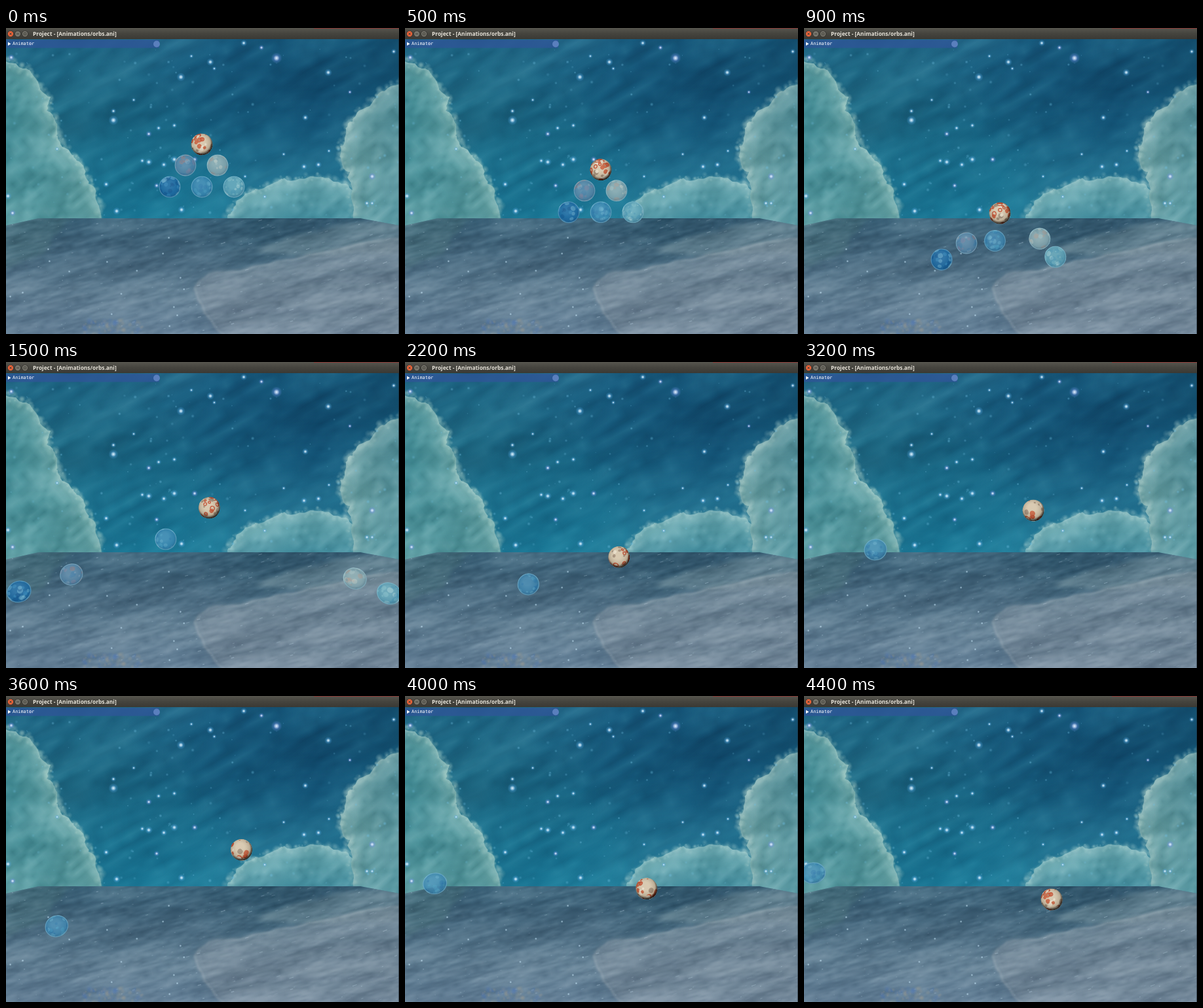
Animation of 600x468 px, one loop 4500 ms. Source, as an HTML page with a canvas:

```html
<!DOCTYPE html>
<html lang="en">
<head>
<meta charset="utf-8">
<title>Orbs</title>
<style>
  html, body { margin: 0; width: 600px; height: 468px; overflow: hidden; background: #18607f; }
  canvas { display: block; }
  div { position: absolute; white-space: pre; }
  #title { left: 41px; top: 0; line-height: 18px; font: bold 8.4px/18px "Open Sans", "Noto Sans", sans-serif; color: #e6e2d8; }
  #panel { left: 10px; top: 18px; font: 6.9px/13px "DejaVu Sans Mono", monospace; color: #fff; }
</style>
</head>
<body>
<canvas id="stage" width="600" height="468"></canvas>
<div id="title">Project - [Animations/orbs.ani]</div>
<div id="panel">Animator</div>
<script>
const W = 600, H = 468, LOOP = 4500, STEP = 100, TAU = Math.PI * 2;
const ctx = document.getElementById('stage').getContext('2d');

function seeded(s) {
  return () => {
    s = (s + 0x6D2B79F5) | 0;
    let n = Math.imul(s ^ (s >>> 15), 1 | s);
    n = (n + Math.imul(n ^ (n >>> 7), 61 | n)) ^ n;
    return ((n ^ (n >>> 14)) >>> 0) / 4294967296;
  };
}

function makeCanvas(w, h) {
  const c = document.createElement('canvas');
  c.width = w;
  c.height = h;
  return c;
}

const rnd = seeded(7);
const spread = a => (rnd() - 0.5) * 2 * a;
const scene = makeCanvas(W, H);
const g = scene.getContext('2d');

function disc(c, x, y, r, fill) {
  c.fillStyle = fill;
  c.beginPath();
  c.arc(x, y, r, 0, TAU);
  c.fill();
}

function glow(x, y, r, rgb, a) {
  const p = g.createRadialGradient(x, y, 0, x, y, r);
  p.addColorStop(0, `rgba(${rgb},${a})`);
  p.addColorStop(1, `rgba(${rgb},0)`);
  disc(g, x, y, r, p);
}

// Smooth value noise: a tiny random picture, scaled up
function noise(cw, ch, alpha, angle) {
  const w = Math.ceil(900 / cw), h = Math.ceil(900 / ch);
  const tile = makeCanvas(w, h), t = tile.getContext('2d');
  for (let y = 0; y < h; y++) for (let x = 0; x < w; x++) {
    const v = rnd() * 255 | 0;
    t.fillStyle = `rgb(${v},${v},${v})`;
    t.fillRect(x, y, 1, 1);
  }
  g.save();
  g.globalCompositeOperation = 'soft-light';
  g.globalAlpha = alpha;
  g.translate(W / 2, H / 2);
  g.rotate(angle);
  g.drawImage(tile, -450, -450, 900, 900);
  g.restore();
}

function rough(pts, amp, depth) {
  for (; depth > 0; depth--, amp /= 1.8) {
    const out = [];
    pts.forEach((p, i) => {
      out.push(p);
      const q = pts[i + 1];
      if (q) out.push([(p[0] + q[0]) / 2 + spread(amp), (p[1] + q[1]) / 2 + spread(amp)]);
    });
    pts = out;
  }
  return pts;
}

function pathOf(pts) {
  const p = new Path2D();
  pts.forEach(([x, y], i) => i ? p.lineTo(x, y) : p.moveTo(x, y));
  return p;
}

function cloud(edge, corners, fill, rim, strength) {
  edge = rough(edge, 5, 3);
  const line = pathOf(edge), area = pathOf(edge.concat(corners));
  g.save();
  g.filter = 'blur(2px)';
  g.fillStyle = fill;
  g.fill(area);
  g.clip(area);
  g.strokeStyle = `rgb(${rim})`;
  for (const [width, blur, alpha] of [[70, 18, 0.25], [22, 7, 0.3], [4, 1.5, 0.35]]) {
    g.filter = `blur(${blur}px)`;
    g.globalAlpha = alpha * strength;
    g.lineWidth = width;
    g.stroke(line);
  }
  g.filter = 'none';
  g.globalAlpha = 1;
  noise(34, 26, 0.35, -0.5);
  noise(11, 8, 0.25, -0.7);
  g.restore();
  for (const [x, y] of edge)
    for (let i = 0; i < 2; i++)
      glow(x + spread(6), y + spread(6), 2 + rnd() * 5, rim, 0.28 * strength);
}

function vertical(y0, y1, ...colors) {
  const p = g.createLinearGradient(0, y0, 0, y1);
  colors.forEach((c, i) => p.addColorStop(i / (colors.length - 1), c));
  return p;
}

function drawSky() {
  g.fillStyle = vertical(17, 292, '#195e7f', '#196685', '#1c7795');
  g.fillRect(0, 0, W, H);
  glow(90, 130, 190, '40,120,140', 0.45);
  glow(210, 270, 170, '26,126,156', 0.5);
  glow(470, 120, 200, '14,70,108', 0.6);
  glow(330, 30, 150, '22,88,126', 0.4);
  noise(150, 45, 0.28, -0.45);
  noise(50, 12, 0.16, -0.5);
  noise(16, 9, 0.1, -0.4);

  cloud([[-5, 47], [20, 60], [46, 78], [68, 105], [63, 127], [78, 158], [86, 182], [108, 203], [121, 226], [136, 246], [146, 292]],
    [[146, 310], [-5, 310]], vertical(50, 300, '#35818c', '#468f98', '#5b9da3'), '172,210,202', 1);
  cloud([[338, 288], [352, 264], [380, 246], [420, 231], [460, 229], [500, 235], [532, 250]],
    [[532, 310], [338, 310]], vertical(228, 292, '#4b929f', '#559ca8', '#438d9e'), '176,214,212', 0.9);
  cloud([[605, 83], [570, 99], [545, 124], [522, 146], [517, 175], [510, 196], [523, 220], [528, 242], [530, 292]],
    [[605, 310]], vertical(85, 300, '#42818f', '#5c979f', '#5a9aa4'), '176,208,202', 0.9);
}

const STARS = [
  413,46,5, 312,52,3.5, 267,75,4, 363,23,3, 390,30,2.5, 318,62,2, 492,68,3.5, 592,36,2.5,
  8,45,3, 164,127,2.5, 164,141,4.5, 457,137,3, 218,162,2.8, 233,153,2.5, 257,149,2.5,
  257,201,3.5, 288,201,3, 218,205,3.5, 208,203,2.5, 241,209,3, 230,241,2.6, 153,239,3,
  169,280,3.5, 3,257,3.5, 10,283,3, 268,278,3.5, 455,212,3, 477,209,3, 559,227,3.5,
  493,188,2, 551,268,2.6, 559,268,2.3, 525,98,2, 424,193,2, 365,227,2, 283,43,2,
  37,24,3, 195,110,2, 78,185,2, 395,258,2
];

function drawStars() {
  for (let i = 0; i < 130; i++)
    glow(rnd() * W, 32 + rnd() * 255, 1 + rnd() * 2.2, '110,190,225', 0.2 + rnd() * 0.35);
  for (let i = 0; i < STARS.length; i += 3) {
    const [x, y, r] = STARS.slice(i, i + 3);
    glow(x, y, r * 1.7, i % 4 ? '90,175,235' : '120,150,240', 0.75);
    glow(x, y, r * 0.9, '235,248,255', 0.95);
  }
}

function drawFloor() {
  g.save();
  g.clip(pathOf([[0, 302], [50, 291], [541, 291], [W, 302], [W, H], [0, H]]));
  g.fillStyle = vertical(291, H, '#385f76', '#4c6e84', '#5d7b90', '#67839a');
  g.fillRect(0, 285, W, 190);
  glow(390, 300, 110, '38,78,100', 0.55);
  g.filter = 'blur(3px)';
  g.fillStyle = 'rgba(88,128,132,.35)';
  g.fill(pathOf(rough([[105, 288], [72, 318], [60, 345], [-5, 372], [-5, 288]], 4, 2)));
  g.fillStyle = 'rgba(128,152,160,.4)';
  g.fill(pathOf(rough([[380, 343], [430, 321], [520, 298], [605, 288], [605, 345], [470, 350]], 4, 2)));
  const lobe = rough([[335, 472], [303, 436], [288, 398], [310, 376], [400, 362], [470, 346], [605, 322]], 4, 3);
  g.fillStyle = 'rgba(150,160,170,.4)';
  g.fill(pathOf(lobe.concat([[605, 472]])));
  g.filter = 'blur(1.5px)';
  g.strokeStyle = 'rgba(190,196,200,.28)';
  g.lineWidth = 3;
  g.stroke(pathOf(lobe));
  g.filter = 'none';
  noise(90, 18, 0.26, -0.22);
  noise(34, 6, 0.22, -0.25);
  noise(9, 3, 0.14, -0.25);
  for (let i = 0; i < 230; i++) {
    const x = rnd() * W, y = 294 + Math.pow(rnd(), 1.2) * 172;
    const len = 1 + rnd() * (1 + x / 90), a = -0.1 - x / 2200;
    g.strokeStyle = `rgba(195,218,232,${0.08 + rnd() * 0.28})`;
    g.lineWidth = 0.6 + rnd() * 0.8;
    g.beginPath();
    g.moveTo(x, y);
    g.lineTo(x + len * Math.cos(a), y + len * Math.sin(a));
    g.stroke();
  }
  for (let i = 0; i < 16; i++)
    glow(rnd() * 290, 320 + rnd() * 140, 2, '200,232,250', 0.75);
  for (let i = 0; i < 80; i++)
    glow(163 + spread(45), 459 + spread(12), 1.5 + rnd() * 5, i % 2 ? '168,158,138' : '70,112,180', 0.25);
  g.restore();
}

function drawWindow() {
  g.fillStyle = vertical(0, 17, '#57564f', '#45443e', '#3a3934');
  g.fillRect(0, 0, W, 17);
  g.fillStyle = 'rgba(150,50,45,.8)';
  g.fillRect(470, 0, 130, 1);
  g.fillStyle = 'rgba(30,40,50,.5)';
  g.fillRect(599, 17, 1, H);
  [7, 18, 29].forEach((x, i) => {
    disc(g, x, 9, 4.8, '#32312d');
    disc(g, x, 9, 4.2, i ? '#77756c' : '#e5633a');
    g.strokeStyle = '#3b3a35';
    g.lineWidth = 0.9;
    g.beginPath();
    if (i === 0) {
      g.moveTo(x - 1.6, 7.4); g.lineTo(x + 1.6, 10.6);
      g.moveTo(x + 1.6, 7.4); g.lineTo(x - 1.6, 10.6);
    } else if (i === 1) {
      g.moveTo(x - 2, 9); g.lineTo(x + 2, 9);
    } else g.rect(x - 1.7, 7.3, 3.4, 3.4);
    g.stroke();
  });
  g.fillStyle = 'rgba(47,84,152,.75)';
  g.fillRect(0, 18, 234, 12.5);
  disc(g, 230, 24.5, 5, '#5a7fbd');
  g.fillStyle = '#fff';
  g.fill(pathOf([[3, 21.5], [7.5, 24.3], [3, 27]]));
}

// x, y: start; at, v: time and speed of the sideways kick; peaks: [time, y] of each bounce
const ORBS = [
  { x: 250, y: 243, at: 0.774, v: -317, peaks: [[1.216, 338.7], [1.85, 338.7]], base: '#1d6ba3', spots: ['#0e4c85', '#3f93c2', '#84c3da'], alpha: 0.9 },
  { x: 299, y: 243, at: 0.805, v: -79.3, peaks: [[1.495, 271], [2.872, 270.4], [4.33, 270]], base: '#3f8db8', spots: ['#2870a6', '#6fb5cf', '#4fa3c2'], alpha: 0.75 },
  { x: 348, y: 243, at: 0.793, v: 335, peaks: [[1.178, 338.2], [1.82, 338.2]], base: '#62a9bb', spots: ['#b9dcdc', '#418fae', '#8cc5cc'], alpha: 0.85 },
  { x: 274, y: 210, at: 0.795, v: -247, peaks: [[1.222, 313], [2.254, 313]], base: '#5d8bab', spots: ['#8a8098', '#3c79a3', '#98b0bd', '#a0706c'], alpha: 0.85 },
  { x: 323, y: 210, at: 0.772, v: 288, peaks: [[1.151, 312.4], [2.2, 312.4]], base: '#8cacb2', spots: ['#c9cfc6', '#628f9f', '#b29486', '#a9c2c2'], alpha: 0.9 },
  { x: 299, y: 178, at: 1.015, v: 23.4, peaks: [[1.514, 223], [3.336, 224], [5.138, 224]], base: '#d6c6ab', spots: ['#bf4a2c', '#ece0cb', '#c85b38', '#9f8a74'], alpha: 1, h: 160, solid: true }
];

ORBS.forEach((o, k) => {
  const r = seeded(31 + k);
  o.marks = Array.from({ length: 60 }, (_, i) => ({
    lat: Math.asin(r() * 2 - 1), lon: r() * TAU, size: 1.3 + r() * 3,
    color: o.spots[i % o.spots.length], ring: o.solid && i % 4 === 0
  }));
});

const heightAt = (o, t) =>
  Math.min(o.y + 155 * t * t, ...o.peaks.map(([pt, py]) => py + (o.h || 154) * (t - pt) ** 2));

function drawOrb(o, t) {
  const R = 16.5;
  const x = o.x + o.v * Math.max(0, t - o.at), y = heightAt(o, t);
  if (x < -30 || x > W + 30) return;
  const far = (x - 300) / 300, tilt = Math.atan((y - 234) / (x - 300 || 1));
  ctx.save();
  ctx.translate(x, y);
  // wide lens: orbs widen away from the middle
  ctx.rotate(tilt);
  ctx.scale(1 + 0.19 * far * far, 1);
  ctx.rotate(-tilt);
  ctx.beginPath();
  ctx.arc(0, 0, R, 0, TAU);
  ctx.clip();
  ctx.globalAlpha = o.alpha;
  disc(ctx, 0, 0, R, o.base);
  ctx.globalAlpha = o.solid ? 0.9 : 0.4;
  const spin = t * 1.4 * (o.v < 0 ? -1 : 1);
  for (const m of o.marks) {
    const lon = m.lon + spin, c = Math.cos(m.lat), depth = c * Math.cos(lon);
    if (depth < 0.05) continue;
    const px = c * Math.sin(lon), py = Math.sin(m.lat);
    ctx.beginPath();
    ctx.ellipse(px * R, py * R, m.size * depth, m.size, Math.atan2(py, px), 0, TAU);
    if (m.ring) {
      ctx.strokeStyle = m.color;
      ctx.lineWidth = 1.5;
      ctx.stroke();
    } else {
      ctx.fillStyle = m.color;
      ctx.fill();
    }
  }
  ctx.globalAlpha = 1;
  const s = ctx.createRadialGradient(-2, -4, R * 0.35, -1, -2, R * 1.13);
  s.addColorStop(0, 'rgba(255,255,255,.08)');
  s.addColorStop(0.65, o.solid ? 'rgba(20,10,5,.15)' : 'rgba(20,70,110,.08)');
  s.addColorStop(1, o.solid ? 'rgba(0,0,0,.95)' : 'rgba(15,55,85,.35)');
  disc(ctx, 0, 0, R, s);
  if (!o.solid) {
    ctx.strokeStyle = 'rgba(160,210,225,.4)';
    ctx.lineWidth = 1.5;
    ctx.beginPath();
    ctx.arc(0, 0, R - 0.5, 0, TAU);
    ctx.stroke();
  }
  ctx.restore();
}

drawSky();
drawStars();
drawFloor();
drawWindow();

const start = performance.now();
function frame(now) {
  const ms = Math.max(0, now - start) % LOOP;
  const t = Math.floor(ms / STEP) * STEP / 1000;
  ctx.drawImage(scene, 0, 0);
  for (const o of ORBS) drawOrb(o, t);
  requestAnimationFrame(frame);
}
frame(start);
</script>
</body>
</html>
```
